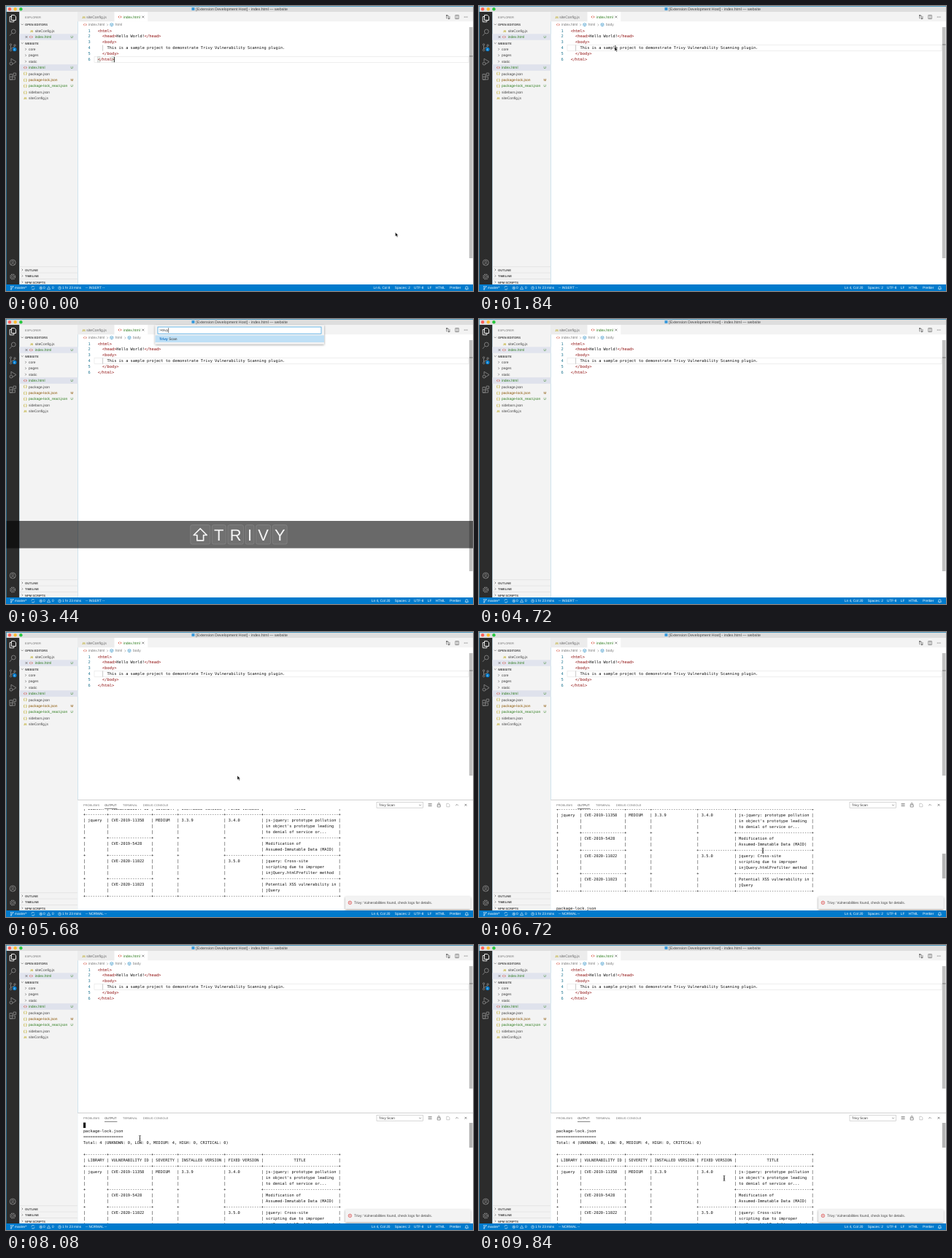
Animation of 640 by 391 pixels, one loop 10000 ms. Source, as an HTML page:

```html
<!DOCTYPE html>
<html lang="en">
<head>
<meta charset="utf-8">
<title>Editor scan demo</title>
<style>
html, body { margin: 0; width: 100%; height: 100%; overflow: hidden; background: #fff; }
svg { display: block; width: 100vw; height: 100vh; }
text { font-family: "Liberation Sans", Arial, sans-serif; white-space: pre; text-rendering: geometricPrecision; }
.mono { font-family: "DejaVu Sans Mono", monospace; font-size: 5.333px; }
</style>
</head>
<body>
<svg id="stage" viewBox="0 0 640 391"></svg>
<script>
const LOOP = 10000, STEP = 80, CHAR = 3.21;
const GREEN = '#2f7d1f', RED = '#d0432f', YELLOW = '#b7a416', BLUE = '#007acc';

// drawing helpers; text is placed by the middle of its line
const esc = s => s.replace(/&/g, '&amp;').replace(/</g, '&lt;').replace(/>/g, '&gt;');
const rect = (x, y, w, h, fill, more = '') =>
  `<rect x="${x}" y="${y}" width="${w}" height="${h}" fill="${fill}" ${more}/>`;
const dot = (x, y, r, fill, more = '') => `<circle cx="${x}" cy="${y}" r="${r}" fill="${fill}" ${more}/>`;
const text = (x, mid, s, fill = '#333', size = 4.95, more = '') =>
  `<text x="${x}" y="${mid + 1.75}" fill="${fill}" font-size="${size}" ${more}>${esc(s)}</text>`;
const bold = (x, mid, s) => text(x, mid, s, '#444', 4.1, 'font-weight="bold"');
const line = (d, stroke = '#555', w = .6, more = '') =>
  `<path d="${d}" fill="none" stroke="${stroke}" stroke-width="${w}" ${more}/>`;
const group = (id, body, more = '') => `<g id="${id}" ${more}>${body}</g>`;

const down = (x, y) => line(`M${x - 1.4} ${y - .7}l1.4 1.4 1.4-1.4`);
const right = (x, y, c = '#555') => line(`M${x - .7} ${y - 1.4}l1.4 1.4-1.4 1.4`, c);
const cross = (x, y, c = '#444', r = 1.4) => line(`M${x - r} ${y - r}l${2 * r} ${2 * r}m0-${2 * r}l-${2 * r} ${2 * r}`, c);
const cube = (x, y) => line(`M${x} ${y - 2.2}l2 1v2.3l-2 1-2-1v-2.3zm-2 1l2 1 2-1m-2 1v2.3`, '#1a85c0', .5);
const icons = {
  html: (x, y) => line(`M${x - .6} ${y - 1.3}l-1.5 1.3 1.5 1.3m1.2-2.6l1.5 1.3-1.5 1.3`, RED, .75),
  js: (x, y) => text(x - 2.3, y, 'JS', YELLOW, 3.8, 'font-weight="bold"'),
  json: (x, y) => text(x - 2.3, y - .2, '{ }', YELLOW, 4.6, 'font-weight="bold"')
};

function titleBar() {
  return rect(0, 0, 640, 391, '#2583b2') + rect(.7, .8, 640, 7.4, '#dedede') +
    dot(5, 4.2, 2.2, '#ff5f57') + dot(12.7, 4.2, 2.2, '#febc2e') + dot(20.4, 4.2, 2.2, '#28c840') +
    rect(254.5, 2, 4, 4, '#3b9bdc') +
    text(260.3, 4, '[Extension Development Host] - index.html — website', '#444', 5.27);
}

function activityBar() {
  const c = '#8a8a8a', w = .85;
  return rect(.7, 8, 17.6, 374, '#2c2c2c') +
    line('M7.5 12.5h4l2 2v5h-6zM7.5 14.5h-2.3v7.3h5.6v-2.3', '#fff', .9) +
    dot(10.3, 35, 2.9, 'none', `stroke="${c}" stroke-width="${w}"`) + line('M8.2 37.2l-3.2 3.6', c, w) +
    line('M6.5 54v5.5M12 55c0 2.5-5 1.5-5.3 4', c, w) +
    [[6.5, 53], [6.5, 60.5], [12, 54]].map(p => dot(...p, 1.2, '#2c2c2c', `stroke="${c}" stroke-width=".8"`)).join('') +
    dot(11.8, 59.5, 2.7, BLUE) + text(10.6, 59.5, '4', '#fff', 3.8) +
    line('M7 76v-3.8l7 4.3-5 3.2', c, w) + dot(7, 79, 2, 'none', `stroke="${c}" stroke-width="${w}"`) +
    line('M5 93.5h3.7v7.4H5zM5 97.2h7.4v3.7H5M10.2 92h3.4v3.4h-3.4z', c, w) +
    dot(9.2, 352, 4, 'none', `stroke="${c}" stroke-width="${w}"`) + dot(9.2, 351, 1.4, 'none', `stroke="${c}" stroke-width=".7"`) +
    line('M6.5 355c1-2.4 4.4-2.4 5.4 0', c, .7) +
    dot(9.2, 371.5, 3.3, 'none', `stroke="${c}" stroke-width="1.3" stroke-dasharray="1.7 .9"`) +
    dot(9.2, 371.5, 1.6, 'none', `stroke="${c}" stroke-width=".8"`);
}

function sideBar() {
  const files = [['html', 'index.html', GREEN, 'U'], ['json', 'package.json', '#444', ''],
    ['json', 'package-lock.json', '#895503', 'M'], ['json', 'package-lock_react.json', GREEN, 'U'],
    ['json', 'sidebars.json', '#444', ''], ['js', 'siteConfig.js', '#444', '']];
  let s = rect(18.3, 8, 80, 374, '#f3f3f3') + text(26, 15, 'EXPLORER', '#6f6f6f', 4) +
    down(22.3, 25.3) + bold(26, 25.3, 'OPEN EDITORS') +
    icons.js(35, 34) + text(39.7, 34, 'siteConfig.js', '#444') +
    rect(18.3, 38.3, 80, 8.4, '#e1e4ee') + cross(28, 42.5) + icons.html(34.3, 42.5) +
    text(39.7, 42.5, 'index.html', GREEN) + text(88.6, 42.5, 'U', GREEN, 4.6) +
    down(22.3, 51) + bold(26, 51, 'WEBSITE') + rect(18.3, 80.2, 80, 8.5, '#dfe2ec');
  ['core', 'pages', 'static'].forEach((n, i) => {
    const y = 59.3 + i * 8.4;
    s += right(27, y) + text(31, y, n, '#444');
  });
  files.forEach(([icon, name, color, mark], i) => {
    const y = 84.5 + i * 8.4;
    s += icons[icon](26.3, y) + text(31, y, name, color) + text(88.6, y, mark, color, 4.6);
  });
  ['OUTLINE', 'TIMELINE', 'NPM SCRIPTS'].forEach((n, i) => {
    const y = 362 + i * 8.4;
    s += line(`M18.3 ${y - 4.3}h80`, '#d4d4d4', .5) + right(22.3, y) + bold(26, y, n);
  });
  return s;
}

const codeY = n => 33.6 + (n - 1) * 7.96;
const codeX = col => 125.7 + (col - 1) * CHAR;

function codeLine(s, i) {
  const body = esc(s).replace(/&lt;.*?&gt;/g, m => `<tspan fill="#8c0808">${m}</tspan>`);
  const y = codeY(i + 1) + 1.9;
  return `<text class="mono" x="112.6" y="${y}" fill="#237893">${i + 1}</text>` +
    `<text class="mono" x="${codeX(1)}" y="${y}" fill="#111">${body}</text>`;
}

// highlighted line with its mark beside the scroll bar
const current = n => rect(121, codeY(n) - 3.9, 513, 7.9, 'none', 'stroke="#e3e3e3" stroke-width=".6"') +
  rect(635, codeY(n) - 5, 4.5, 1, '#555');
const caret = (n, col) => rect(codeX(col) - .2, codeY(n) - 3.6, .8, 7.4, '#111');
const bracket = (n, col) => rect(codeX(col), codeY(n) - 3.6, CHAR, 7.2, '#e8eee8', 'stroke="#b5b5b5" stroke-width=".4"');

function editor() {
  const code = ['<html>', '  <head>Hello World!</head>', '  <body>',
    '    This is a sample project to demonstrate Trivy Vulnerability Scanning plugin.', '  </body>', '</html>'];
  return rect(98.3, 8, 542, 374, '#fff') + rect(98.3, 8, 542, 13.2, '#f3f3f3') +
    rect(98.3, 8, 50, 13.2, '#ececec') + rect(148.6, 8, 45.6, 13.4, '#fff') +
    icons.js(106.5, 15) + text(110.3, 15, 'siteConfig.js', '#666', 5.05) +
    icons.html(156, 15) + text(160.8, 15, 'index.html', GREEN, 5.05) + cross(187.8, 15) +
    line('M604 13h2.2v3.8M604.8 17h-1v-3.2M608 18v-4', '#555') + dot(604, 13, .9, '#555') + dot(606.8, 17.3, .9, '#555') +
    line('M615.8 12.6h4.6v5h-4.6zM618.1 12.6v5') + [628.3, 630.2, 632.1].map(x => dot(x, 15, .55, '#555')).join('') +
    icons.html(108.3, 25.6) + text(112.8, 25.6, 'index.html', '#777') + right(139, 25.8, '#888') +
    cube(144.8, 25.7) + text(149.8, 25.6, 'html', '#777') +
    group('crumb', right(163.3, 25.8, '#888') + cube(169, 25.7) + text(174, 25.6, 'body', '#777')) +
    group('line6', current(6) + bracket(6, 1) + bracket(6, 7)) + group('line4', current(4)) +
    line('M132.6 53.6v7.9', '#a5a5a5', .6) + code.map(codeLine).join('') +
    group('caret6', caret(6, 8)) + group('caret4', caret(4, 20)) +
    rect(634.8, 29, 4.7, 317, '#8c8c8c', 'id="slider" fill-opacity=".55"');
}

function outputLines() {
  const W = [9, 18, 10, 19, 15, 32];
  const row = (...cells) => '|' + W.map((w, i) => (' ' + (cells[i] || '')).padEnd(w)).join('|') + '|';
  const rule = on => '+' + W.map((w, i) => (on[i] > 0 ? '-' : ' ').repeat(w)).join('+') + '+';
  const note = s => row('', '', '', '', '', s), full = rule('111111');
  const report = ['', 'package-lock.json', '='.repeat(17),
    'Total: 4 (UNKNOWN: 0, LOW: 0, MEDIUM: 4, HIGH: 0, CRITICAL: 0)', '', full,
    row('LIBRARY', 'VULNERABILITY ID', 'SEVERITY', 'INSTALLED VERSION', 'FIXED VERSION', ' '.repeat(12) + 'TITLE'), full,
    row('jquery', 'CVE-2019-11358', 'MEDIUM', '3.3.9', '3.4.0', 'js-jquery: prototype pollution'),
    note("in object's prototype leading"), note('to denial of service or...'), rule('010001'),
    row('', 'CVE-2019-5428', '', '', '', 'Modification of'), note('Assumed-Immutable Data (MAID)'), rule('010011'),
    row('', 'CVE-2020-11022', '', '', '3.5.0', 'jquery: Cross-site'),
    note('scripting due to improper'), note('injQuery.htmlPrefilter method'), rule('010001'),
    row('', 'CVE-2020-11023', '', '', '', 'Potential XSS vulnerability in'), note('jQuery'), full, ''];
  return [...report, ...report, ...report];
}

function panel() {
  const out = outputLines().map((s, i) =>
    `<text class="mono" x="105.9" y="${248.9 + i * 8}" fill="#111">${esc(s)}</text>`).join('');
  return rect(98.3, 230, 542, 152, '#fff') + line('M98.3 230.4h542', '#bbb', .7) +
    text(106, 237.3, 'PROBLEMS', '#777', 3.98) + text(135.2, 237.3, 'OUTPUT', '#333', 3.98) +
    text(160, 237.3, 'TERMINAL', '#777', 3.98) + text(187.8, 237.3, 'DEBUG CONSOLE', '#777', 3.98) +
    line('M135 242.3h17.4', '#444', .7) +
    rect(508, 233.6, 63.5, 7.6, '#fff', 'stroke="#bbb" stroke-width=".6"') + text(510.8, 237.3, 'Trivy Scan', '#333', 4.7) + down(567.5, 237.5) +
    line('M578.6 235.5h5M578.6 237.2h5M578.6 238.9h5') +
    line('M591.2 237h4v3h-4zM592 237v-1.3c0-1.6 2.4-1.6 2.4 0v1.3') +
    line('M603.8 235.3h2.6l1.5 1.5v3h-4.1z', '#aaa') + line('M616.2 238.2l1.8-1.8 1.8 1.8') + cross(630, 237.3) +
    `<g clip-path="url(#body)">` + group('output', rect(106, 243.6, 3.2, 7.4, '#111', 'id="block"') + out) + '</g>' +
    rect(634.8, 244, 4.7, 34, '#8c8c8c', 'id="thumb" fill-opacity=".65"');
}

const notice = rect(465, 363, 171.5, 17, '#f3f3f3', 'filter="url(#shadow)"') +
  dot(471.4, 371.4, 2.2, 'none', 'stroke="#d83b3b" stroke-width=".7"') + cross(471.4, 371.4, '#d83b3b', .9) +
  text(477, 371.4, 'Trivy: Vulnerabilities found, check logs for details.', '#444', 4.93);

function statusBar() {
  const t = (x, s, id = '') => text(x, 386.7, s, '#fff', 4.75, id && `id="${id}"`), w = '#fff';
  return rect(0, 382, 640, 9, BLUE) +
    line('M7 385.2v3.6M9.6 385.3c0 2-2.2 1.2-2.6 2.4', w) + dot(7, 384.7, .7, w) + dot(7, 388.9, .7, w) + dot(9.6, 384.8, .7, w) +
    t(12, 'master*') + line('M35 386.4a2 2 0 0 1 3.8-.7M39 387.2a2 2 0 0 1-3.8.7', w) +
    dot(47.8, 386.8, 1.8, 'none', 'stroke="#fff" stroke-width=".5"') + cross(47.8, 386.8, w, .8) + t(51, '0') +
    line('M58.6 384.8l2.1 3.8h-4.2z', w, .5) + t(63, '0') +
    dot(73.6, 386.8, 1.9, 'none', 'stroke="#fff" stroke-width=".5"') + line('M73.6 385.6v1.3h1', w, .5) +
    t(77, '1 hr 23 mins') + t(109, '', 'mode') +
    text(526.5, 386.7, '', w, 4.75, 'id="pos" text-anchor="end"') +
    t(532.8, 'Spaces: 2') + t(559, 'UTF-8') + t(577.8, 'LF') + t(588.8, 'HTML') + t(608, 'Prettier') +
    line('M629.2 388.2h4.4l-.8-1.2v-1c0-2-2.8-2-2.8 0v1zM630.8 389h1.2', w, .6);
}

const palette = rect(204.5, 8.4, 231.5, 26, '#f3f3f3', 'id="list" filter="url(#shadow)"') +
  rect(208, 11, 224, 9.2, '#fff', 'stroke="#2f9be0" stroke-width=".7"') +
  text(210.3, 15.6, '', '#333', 4.95, 'id="query"') + rect(222.6, 12.2, .6, 6.8, '#222', 'id="inputCaret"') +
  rect(204.5, 22.4, 231.5, 9.6, '#bfe0f6') +
  text(210.3, 27, 'Trivy', '#0066bf', 4.85, 'font-weight="bold"') + text(223.3, 27, 'Scan', '#333', 4.95);

const keyWidth = { '⇧': 27, T: 19, R: 21.5, I: 12, V: 20, Y: 20 };
function keyCaps(keys) {
  const gap = 2.6;
  let x = 319 - ([...keys].reduce((sum, k) => sum + keyWidth[k] + gap, -gap)) / 2;
  return [...keys].map(k => {
    const w = keyWidth[k], mid = x + w / 2;
    const face = k === '⇧'
      ? line(`M${mid} 287.5l9 9h-4.6v7.3h-8.8v-7.3h-4.6z`, '#f5f5f5', 1.7, 'stroke-linejoin="round"')
      : `<text x="${mid}" y="304" font-size="22" fill="#f5f5f5" text-anchor="middle">${k}</text>`;
    const cap = rect(x, 282.5, w, 26.5, '#fff', 'rx="2.5" fill-opacity=".06" stroke="#999" stroke-opacity=".6" stroke-width=".7"');
    x += w + gap;
    return cap + face;
  }).join('');
}

const stage = document.getElementById('stage');
stage.innerHTML = `<defs><clipPath id="body">${rect(98, 243, 542, 139, '#000')}</clipPath>
  <filter id="shadow" x="-10%" y="-30%" width="120%" height="170%"><feDropShadow dx="0" dy="1" stdDeviation="1.5" flood-opacity=".4"/></filter></defs>` +
  titleBar() + activityBar() + sideBar() + editor() + group('panel', panel()) + statusBar() + group('notice', notice) +
  group('palette', palette) + group('overlay', rect(.7, 277, 640, 37.5, '#000', 'fill-opacity=".59"') + group('keys', '')) +
  group('mouse',
    group('arrow', '<path d="M0 0v5.8l1.4-1.2 1 2.2 1-.5-1-2.1h1.8z" fill="#111" stroke="#fff" stroke-width=".4"/>') +
    group('beam', line('M-1.3-3.6q1.3 0 1.3.9v5.4q0 .9-1.3.9M1.3-3.6q-1.3 0-1.3.9v5.4q0 .9 1.3.9M-.7 1h1.4', '#333', .75)));

const ui = {};
stage.querySelectorAll('[id]').forEach(e => ui[e.id] = e);
const show = (name, on) => ui[name].setAttribute('display', on ? 'inline' : 'none');

// rows of [time, value, value...], linear between them
function track(rows, t) {
  const i = rows.findIndex(r => r[0] > t);
  if (i === 0) return rows[0].slice(1);
  if (i < 0) return rows[rows.length - 1].slice(1);
  const a = rows[i - 1], b = rows[i], k = (t - a[0]) / (b[0] - a[0]);
  return a.slice(1).map((v, n) => v + (b[n + 1] - v) * k);
}

const mousePath = [[0, 533.5, 310.5], [480, 335, 197], [640, 335, 197], [720, 300, 165], [960, 300, 165],
  [1680, 186, 56], [5200, 186, 56], [5600, 317, 197], [5680, 317, 197], [6000, 389, 300], [7680, 389, 300],
  [8080, 183.5, 265], [8480, 215, 274], [8640, 215, 274], [9120, 336, 320]];
const scrollPath = [[6080, 421], [6720, 244], [7440, 0]];

function draw(t) {
  const clicked = t >= 1680, open = t >= 2480 && t < 4720, panelOn = t >= 4960, result = t >= 5360;
  const typed = t < 2800 ? 0 : Math.min(5, Math.floor((t - 2800) / 160) + 1);
  const blink = t % 1000 < 600;

  show('line6', !clicked);
  show('line4', clicked);
  show('crumb', clicked);
  show('caret6', !clicked && blink);
  show('caret4', clicked && t < 2480);
  ui.slider.setAttribute('height', panelOn ? 168 : 317);
  ui.pos.textContent = t < 1840 ? 'Ln 6, Col 8' : 'Ln 4, Col 20';
  ui.mode.textContent = panelOn ? '-- NORMAL --' : '-- INSERT --';

  show('palette', open);
  ui.list.setAttribute('height', typed ? 26 : 171);
  ui.query.textContent = '>' + 'trivy'.slice(0, typed);
  ui.inputCaret.setAttribute('x', 213.4 + [0, 1.4, 3, 4.1, 6.6, 9.1][typed]);
  show('inputCaret', blink);
  show('overlay', t >= 2320 && t < 4000);
  ui.keys.innerHTML = keyCaps('⇧' + 'TRIVY'.slice(0, typed));

  const [scroll] = track(scrollPath, t);
  show('panel', panelOn);
  show('output', result);
  show('notice', result);
  show('block', t < 8720);
  show('thumb', t >= 6000);
  ui.output.setAttribute('transform', `translate(0 ${-scroll})`);
  ui.thumb.setAttribute('y', 244 + scroll * 138 / 560);

  const [x, y] = track(mousePath, t);
  ui.mouse.setAttribute('transform', `translate(${x} ${y})`);
  show('mouse', t < 2320 || t >= 5200);
  show('arrow', !(panelOn && y > 243));
  show('beam', panelOn && y > 243);
}

const start = performance.now();
function tick() {
  const t = (performance.now() - start) % LOOP;
  draw(Math.floor(t / STEP) * STEP);
  requestAnimationFrame(tick);
}
tick();
</script>
</body>
</html>
```
